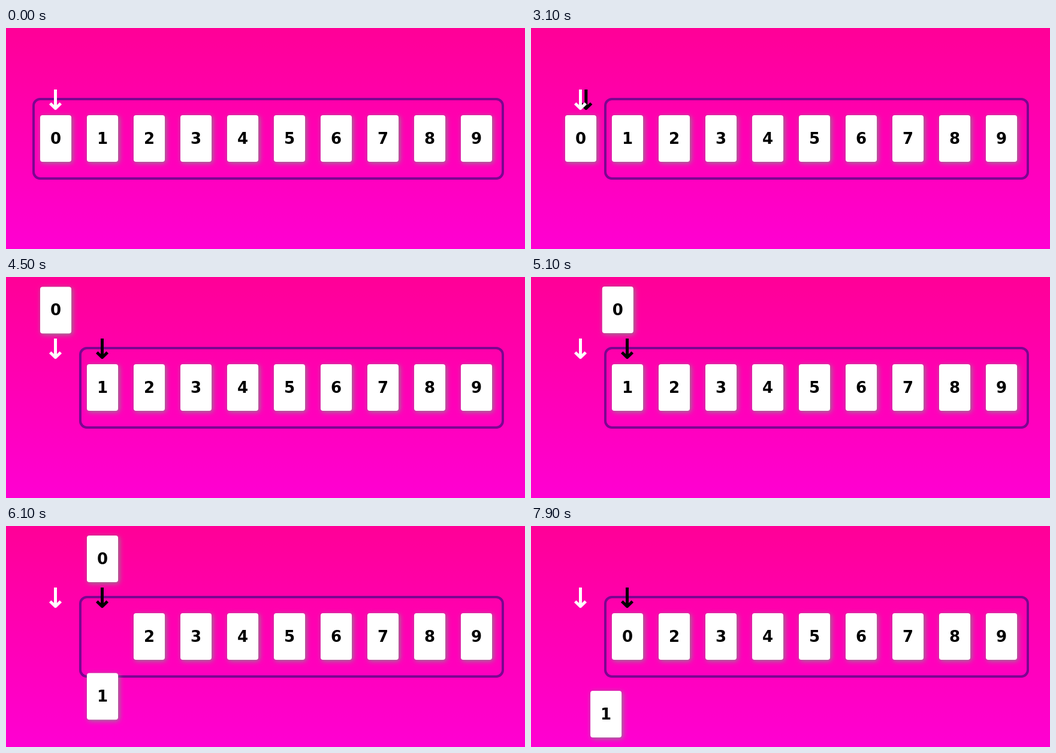
An HTML page for the animation above (8000 ms loop, 866x370 px).

```html
<!DOCTYPE html>
<html lang="en">
<head>
<meta charset="utf-8">
<title>Card swap</title>
<style>
  html, body { margin: 0; width: 100%; height: 100%; overflow: hidden; }
  #stage {
    position: relative; width: 866px; height: 370px; overflow: hidden;
    background: linear-gradient(#ff0097, #ff00d2);
  }
  #stage > * { position: absolute; left: 0; top: 0; }
  #range {
    top: 117px; height: 137px; box-sizing: border-box;
    border: 4px solid #7c0590; border-radius: 13px;
  }
  .card {
    width: 52px; height: 78px; border-radius: 4px;
    background: #fff; color: #000; box-shadow: 2px 2px 8px #888;
    font: bold 26px/78px "DejaVu Sans", sans-serif; text-align: center;
  }
  .arrow { fill: none; stroke-width: 5; stroke-linejoin: round; }
</style>
</head>
<body>
<div id="stage">
  <div id="range"></div>
  <svg width="866" height="370">
    <defs>
      <path id="arrow" class="arrow" d="M82.5 103V134M73.7 126.3L82.5 134.7L91.3 126.3"/>
    </defs>
    <use id="pick" href="#arrow" stroke="#000"/>
    <use href="#arrow" stroke="#fff"/>
  </svg>
</div>
<script>
const LOOP = 8000, STEP = 100, PITCH = 78, LIFT = 130;
const HOME_X = 57, HOME_Y = 146, RANGE_LEFT = 44, RANGE_RIGHT = 831;
const stage = document.getElementById('stage');
const range = document.getElementById('range');
const pick = document.getElementById('pick');

const cards = Array.from({ length: 10 }, (_, i) => {
  const card = document.createElement('div');
  card.className = 'card';
  card.textContent = i;
  stage.append(card);
  place(card, HOME_X + PITCH * i, HOME_Y);
  return card;
});

function place(el, x, y) {
  el.style.transform = `translate(${x}px, ${y}px)`;
}

// The CSS "ease" curve: cubic-bezier(.25, .1, .25, 1)
function ease(x) {
  const bezier = (a, b, u) => 3 * a * u * (1 - u) ** 2 + 3 * b * u * u * (1 - u) + u ** 3;
  let low = 0, high = 1;
  for (let i = 0; i < 24; i++) {
    const mid = (low + high) / 2;
    if (bezier(.25, .25, mid) < x) low = mid; else high = mid;
  }
  return bezier(.1, 1, low);
}

function progress(time, start, duration = 1000) {
  const x = (time - start) / duration;
  return x <= 0 ? 0 : x >= 1 ? 1 : ease(x);
}

function draw(time) {
  const left = RANGE_LEFT + PITCH * progress(time, 1010);
  range.style.left = left + 'px';
  range.style.width = RANGE_RIGHT - left + 'px';

  const picked = progress(time, 3040, 520);
  pick.style.visibility = picked ? 'visible' : 'hidden';
  pick.setAttribute('x', PITCH * picked);

  const rise = progress(time, 3575) - progress(time, 6666);
  place(cards[0], HOME_X + PITCH * progress(time, 4610), HOME_Y - LIFT * rise);
  place(cards[1],
    HOME_X + PITCH * (1 - progress(time, 7626)),
    HOME_Y + LIFT * progress(time, 5630));
}

const begin = performance.now();
function frame() {
  const time = (performance.now() - begin) % LOOP;
  draw(Math.floor(time / STEP) * STEP);
  requestAnimationFrame(frame);
}
frame();
</script>
</body>
</html>
```
